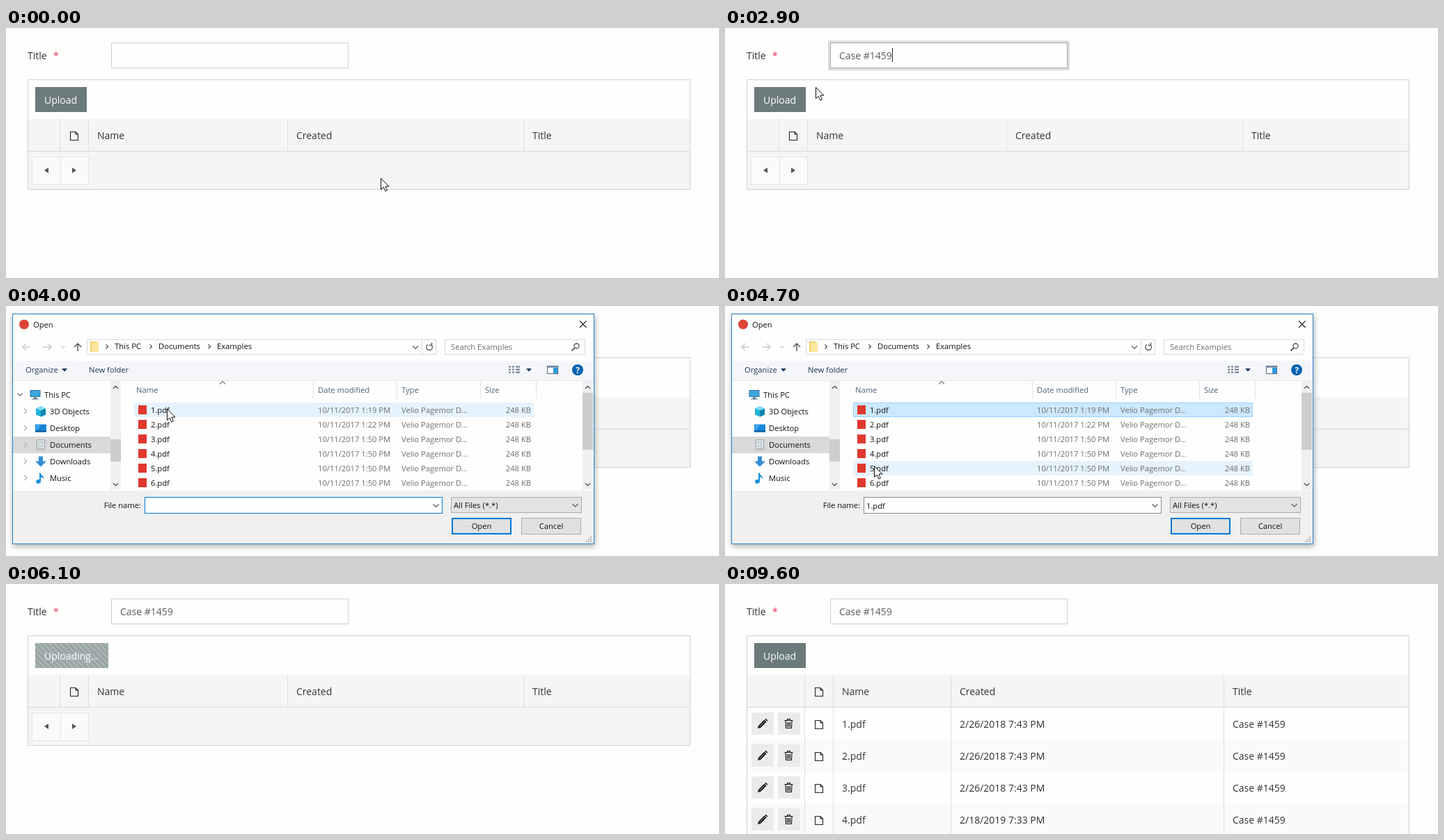
Write an HTML page that moves like this. It is 1024 px wide and 360 px high and loops after 9900 ms.

```html
<!DOCTYPE html>
<html lang="en">
<head>
<meta charset="utf-8">
<title>Upload files</title>
<style>
html, body { margin: 0; width: 100%; height: 100%; overflow: hidden; background: #fefefd; }
svg { display: block; width: 1024px; height: 360px; font-family: "Open Sans", "Noto Sans", sans-serif; }
text { white-space: pre; }
</style>
</head>
<body>
<svg viewBox="0 0 1024 360">
  <defs>
    <filter id="shadow" x="-5%" y="-5%" width="110%" height="115%">
      <feDropShadow dx="1" dy="3" stdDeviation="4" flood-color="#000" flood-opacity=".33"/>
    </filter>
    <pattern id="stripes" width="8" height="8" patternUnits="userSpaceOnUse">
      <path fill="#a9b4b4" d="M0 0h8v8H0z"/>
      <path fill="#96a3a3" d="M0 0H4L8 4V8ZM0 4V8H4Z"/>
    </pattern>
    <clipPath id="panes"><path d="M10 108H844V265H10Z"/></clipPath>
  </defs>
  <g id="scene"></g>
</svg>
<script>
const LOOP = 9900, STEP = 100;
const scene = document.getElementById('scene');
const stripes = document.getElementById('stripes');
const pen = document.createElement('canvas').getContext('2d');
pen.font = '14px "Open Sans", "Noto Sans", sans-serif';

const TITLE = 'Case #1459';
const KEY_TIMES = [1200, 1300, 1400, 1600, 1800, 2000, 2200, 2300, 2500, 2700];
const EMPTY_COLUMNS = [77.5, 118.5, 404.5, 743.5];
const LOADED_COLUMNS = [114.5, 155.5, 360.5, 768.5];
const FINAL_COLUMNS = [114.5, 155.5, 324.5, 716.5];
const POINTER = [
  [0, 538, 216], [300, 256, 41], [600, 256, 41], [900, 596, 294], [2800, 596, 294],
  [2900, 130, 85], [3200, 90, 100], [3600, 90, 100], [4000, 231, 148], [4100, 231, 148],
  [4300, 214, 302], [4400, 210, 252], [4600, 213, 212], [4700, 214, 230], [4900, 214, 230],
  [5200, 684, 315], [5600, 684, 315]
];

const lerp = (a, b, k) => a + (b - a) * k;
const clamp = v => Math.max(0, Math.min(1, v));
const rect = (x, y, w, h, fill, stroke = 'none', width = 1) =>
  `<rect x="${x}" y="${y}" width="${w}" height="${h}" fill="${fill}" stroke="${stroke}" stroke-width="${width}"/>`;
const line = (d, stroke, width = 1) => `<path d="${d}" fill="none" stroke="${stroke}" stroke-width="${width}"/>`;
const shape = (d, fill) => `<path d="${d}" fill="${fill}"/>`;
const label = (x, y, str, fill = '#333', size = 14, extra = '') =>
  `<text x="${x}" y="${y}" fill="${fill}" font-size="${size}" ${extra}>${str}</text>`;
const small = (x, y, str, fill = '#111', extra = '') => label(x, y, str, fill, 11.2, extra);
const group = (content, attrs) => `<g ${attrs}>${content}</g>`;
const at = (x, y, content) => group(content, `transform="translate(${x} ${y})"`);
const chevron = (x, y, dir, color = '#666', s = 3) => line({
  right: `M${x - s / 2} ${y - s}l${s} ${s}l${-s} ${s}`,
  down: `M${x - s} ${y - s / 2}l${s} ${s}l${s} ${-s}`,
  up: `M${x - s} ${y + s / 2}l${s} ${-s}l${s} ${s}`
}[dir], color, 1.2);

function pointerAt(t) {
  const i = POINTER.findIndex(p => p[0] > t);
  if (i < 0) return null;
  const [a, b] = [POINTER[i - 1], POINTER[i]];
  const k = (t - a[0]) / (b[0] - a[0]);
  return { x: lerp(a[1], b[1], k), y: lerp(a[2], b[2], k) };
}

const inside = (p, x, y, w, h) => p && p.x >= x && p.x < x + w && p.y >= y && p.y < y + h;

function pointer(p) {
  if (!p) return '';
  if (inside(p, 151, 21, 341, 37) && !inDialog)
    return at(Math.round(p.x), Math.round(p.y), line('M0 -7.5H3M4 -7.5H7M3.5 -7V7M0 7.5H3M4 7.5H7', '#222'));
  return at(Math.round(p.x) + .5, Math.round(p.y) + .5,
    '<path d="M0 0V16L3.7 12.6L6.3 18.5L8.9 17.4L6.4 11.6H11.4Z" fill="#fff" stroke="#111"/>');
}
let inDialog = false;

const docIcon = (x, y) => at(x, y, line('M.5 .5H8L11.5 4V12.5H.5ZM8 .5V4H11.5', '#222', 1.1));
const pencil = (x, y) => at(x, y,
  shape('M-7 7L-6 3L2.5 -5.5L5.5 -2.5L-3 6ZM3.3 -6.2L4.6 -7.3L7.2 -4.7L6.2 -3.3Z', '#111') +
  line('M-4.7 4.5L3 -3.2', '#ddd', .8));
const trash = (x, y) => at(x, y,
  line('M-6 -4.5H6M-2 -5V-6.5H2V-5M-4.5 -4L-4 6.5H4L4.5 -4M-2 -2V5M0 -2V5M2 -2V5', '#111', 1.1));

function field(t) {
  const focused = t >= 600 && t < 3400;
  const typed = TITLE.slice(0, KEY_TIMES.filter(k => k <= t).length);
  const caret = Math.round(164 + pen.measureText(typed).width) + .5;
  return label(31, 45, 'Title') + label(68, 45, '*', '#f0325a') +
    (focused ? rect(148, 18, 347, 43, '#dcdfde') : '') +
    rect(151.5, 21.5, 340, 36, '#fefefe', focused ? '#a3a9a9' : '#cfcfd3') +
    label(164, 45, typed, '#5a5a63') +
    (focused && t < 3200 ? line(`M${caret} 29V49`, '#222') : '');
}

function uploadButton(t, p) {
  const busy = t >= 5600 && t < 8800;
  const hover = t < 3400 && inside(p, 42, 85, 74, 36);
  const fill = busy ? 'url(#stripes)' : hover ? '#596767' : '#6b7a7a';
  return rect(42, 85, busy ? 105 : 74, 36, fill) +
    label(55, 109, busy ? 'Uploading...' : 'Upload', '#fff', 14, 'font-weight="500"');
}

function gridRow(i, cols, iconAlpha) {
  const y = 178 + 46 * i, base = y + 29;
  const created = i < 3 ? '2/26/2018 7:43 PM' : '2/18/2019 7:33 PM';
  return rect(32, y, 950, 46, i % 2 ? '#fafafc' : '#fefefe') +
    rect(38, y + 7, 32, 32, '#ebebee') + rect(76, y + 7, 32, 32, '#ebebee') +
    group(pencil(54, y + 23) + trash(91.5, y + 23), `opacity="${iconAlpha}"`) +
    docIcon(cols[0] + 14.5, y + 18) +
    label(cols[1] + 12.5, base, `${i + 1}.pdf`) +
    label(cols[2] + 12.5, base, created) +
    label(cols[3] + 12.5, base, TITLE);
}

function grid(t) {
  const loaded = t >= 8800;
  const settle = clamp((t - 9300) / 300);
  const cols = loaded ? LOADED_COLUMNS.map((c, i) => lerp(c, FINAL_COLUMNS[i], settle)) : EMPTY_COLUMNS;
  let out = rect(32, 131, 950, 47, '#f5f5f4') + docIcon(cols[0] + 14.5, 149);
  ['Name', 'Created', 'Title'].forEach((name, i) => { out += label(cols[i + 1] + 12.5, 160, name); });
  if (loaded) {
    for (let i = 0; i < 4; i++) out += gridRow(i, cols, settle);
  } else {
    out += rect(32, 178, 950, 54, '#f5f5f4') +
      rect(37.5, 185.5, 81, 40, '#fafafd', '#e5e5ea') + line('M78.5 186V225', '#e5e5ea') +
      shape('M61 201V209L55 205ZM95 201V209L101 205Z', '#555');
  }
  out += cols.map(c => line(`M${c} 131V${loaded ? 360 : 178}`, '#dedee4')).join('');
  return out + line('M32 177.5H982', '#d9d9dd') +
    rect(31.5, 74.5, 951, loaded ? 300 : 158, 'none', '#cfcfdb');
}

function treeIcon(kind) {
  return {
    pc: rect(1, 1, 14, 9, '#3ba7e0', '#31739b') + shape('M6 11H10V13H13V14H3V13H6Z', '#537083'),
    cube: shape('M1 3L8 0L15 3V12L8 15L1 12Z', '#23b4dc') + shape('M8 6L15 3V12L8 15Z', '#1384b0') + shape('M1 3L8 0L15 3L8 6Z', '#82dcf2'),
    desktop: rect(0, 2, 16, 11, '#1683d8') + shape('M0 11H16V13H0Z', '#0b5c9d') + shape('M1 3H8L3 10H1Z', '#40a8ef'),
    docs: rect(2.5, .5, 11, 14, '#fafafa', '#8d969c') + line('M4 3.5H12M4 6.5H7M8 6.5H12M4 9.5H12M4 12.5H12', '#6f8796'),
    down: shape('M5 0H11V7H16L8 15L0 7H5Z', '#328ed8'),
    music: shape('M6 0H8C8 4 13 4 12 9C11 6 9 6 8 6V12A3.5 3 0 1 1 6 9.5Z', '#1992dc')
  }[kind];
}

function tree(showArrows) {
  const items = [['This PC', 'pc'], ['3D Objects', 'cube'], ['Desktop', 'desktop'],
    ['Documents', 'docs'], ['Downloads', 'down'], ['Music', 'music']];
  let out = rect(10, 188, 140, 24, '#d9d9d9');
  items.forEach(([name, kind], i) => {
    const y = 127.5 + 24 * i, indent = i ? 8 : 0;
    out += at(34 + indent, y - 7, treeIcon(kind)) + small(55 + indent, y + 4.5, name);
    if (showArrows) out += chevron(20 + indent, y, i ? 'right' : 'down', i ? '#aaa' : '#666', 3.5);
  });
  return out + scrollbar(150, 192, 32);
}

const scrollbar = (x, thumbY, thumbH) => rect(x, 108, 15, 157, '#f0f0f0') +
  rect(x, thumbY, 15, thumbH, '#cdcdcd') +
  chevron(x + 7.5, 117, 'up', '#444', 3.5) + chevron(x + 7.5, 257, 'down', '#444', 3.5);

function fileList(p, selected) {
  let out = '';
  for (let i = 0; i < 6; i++) {
    const y = 139 + 21 * i, base = y + 15;
    if (i < selected) out += rect(184.5, y + .5, 573, 20, '#cce8ff', '#99d1ff');
    else if (inside(p, 184, y, 574, 21)) out += rect(184, y, 574, 21, '#e5f3fd');
    const time = ['1:19', '1:22'][i] || '1:50';
    out += rect(190, y + 4, 12, 13, '#e0382f') + small(208, base, `${i + 1}.pdf`) +
      small(448, base, `10/11/2017 ${time} PM`, '#6d6d6d') +
      small(568, base, 'Velio Pagemor D...', '#6d6d6d') +
      small(754, base, '248 KB', '#6d6d6d', 'text-anchor="end"');
  }
  [[187, 'Name'], [448, 'Date modified'], [568, 'Type'], [688, 'Size']].forEach(([x, name]) => {
    out += small(x, 125, name, '#4c607a');
  });
  return out + line('M441.5 108V133M561.5 108V133M681.5 108V133M761.5 108V133', '#e2e2e2') +
    chevron(311, 110.5, 'up', '#777', 4) + scrollbar(828, 125, 82);
}

function dialogChrome() {
  return rect(9.5, 11.5, 835, 331, '#fefefe', '#2580c8') +
    '<circle cx="26" cy="26.5" r="7" fill="#db4437"/>' + small(39, 31, 'Open') +
    line('M824 21.5L833.5 31M833.5 21.5L824 31', '#222', 1.2) +
    line('M35 59H24M29 54L24 59L29 64M53 59H65M60 54L65 59L60 64', '#c9c9c9', 1.4) +
    chevron(82, 59, 'down', '#c9c9c9', 2.5) +
    line('M103 65V54M98 59L103 54L108 59', '#555', 1.5) +
    rect(116.5, 48.5, 501, 21, '#fefefe', '#d9d9d9') +
    shape('M121 51H129L133 53V66H121Z', '#f5cf69') + shape('M123 53H133V66H123Z', '#ffe69c') +
    [[145, 156, 'This PC'], [208, 219, 'Documents'], [292, 303, 'Examples']]
      .map(([c, x, s]) => chevron(c, 58.5, 'right', '#444') + small(x, 62, s)).join('') +
    chevron(588, 59.5, 'down', '#555', 4) + line('M597.5 49V69', '#d9d9d9') +
    line('M611 56A4.3 4.3 0 1 1 606 55.5M611.5 52.5V56.5H607.5', '#555', 1.3) +
    rect(630.5, 48.5, 201, 21, '#fefefe', '#d9d9d9') + small(639, 62.5, 'Search Examples', '#6d6d6d') +
    '<circle cx="819.5" cy="57.5" r="3.5" fill="none" stroke="#555" stroke-width="1.3"/>' +
    line('M817 60L812.5 64.5', '#555', 1.8) +
    rect(10, 79, 834, 28, '#f5f6f9') + line('M10 107.5H844', '#e6e8ec') +
    small(28, 95.5, 'Organize', '#1e395b') + shape('M80 90H88L84 94.5ZM747 90H755L751 94.5Z', '#1e395b') +
    small(119, 95.5, 'New folder', '#1e395b') +
    line('M722 87.5H725M727 87.5H730M732 87.5H738M722 91.5H725M727 91.5H730M732 91.5H738M722 95.5H725M727 95.5H730M732 95.5H738', '#69788c', 2) +
    rect(777.5, 86.5, 15, 11, '#fefefe', '#526b86') + rect(778, 87, 14, 2, '#8aa0b8') + rect(786, 89, 6, 8, '#2a9be0') +
    '<circle cx="821" cy="92" r="8" fill="#0063b1"/>' +
    label(821, 96.5, '?', '#fff', 12, 'font-weight="700" text-anchor="middle"');
}

function dialogFooter(p, t, selected) {
  const names = ['', '1.pdf'][selected] ?? '"5.pdf" "1.pdf" "2.pdf" "3.pdf" "4.pdf"';
  const overOpen = inside(p, 640, 305, 86, 24);
  return rect(10, 266, 834, 76, '#f0f0f1') +
    small(194, 291, 'File name:', '#111', 'text-anchor="end"') +
    rect(199.5, 275.5, 427, 23, '#fefefe', selected ? '#8a8a8a' : '#0078d7') +
    small(203, 291.5, names) + chevron(617.5, 287.5, 'down', '#555', 4) +
    rect(639.5, 275.5, 187, 22, '#e3e3e3', '#adadad') + small(643, 291, 'All Files (*.*)') +
    chevron(817.5, 287, 'down', '#555', 4) +
    rect(641, 306, 84, 22, overOpen ? (t >= 5400 ? '#cce4f7' : '#e5f1fb') : '#e1e1e1', '#0078d7', 2) +
    small(683, 321, 'Open', '#111', 'text-anchor="middle"') +
    rect(740.5, 305.5, 85, 23, '#e1e1e1', '#adadad') +
    small(783, 321, 'Cancel', '#111', 'text-anchor="middle"') +
    shape('M839 332h2v2h-2zM836 335h2v2h-2zM839 335h2v2h-2zM833 338h2v2h-2zM836 338h2v2h-2zM839 338h2v2h-2z', '#b5b5b5');
}

function dialog(t, p) {
  const selected = t < 4100 ? 0 : t < 4900 ? 1 : 5;
  const fading = t < 3500 || t >= 5500;
  const zoom = fading ? 'transform="translate(427 177) scale(.95) translate(-427 -177)" opacity=".5"' : '';
  return group(
    group(dialogChrome(), 'filter="url(#shadow)"') +
    group(tree(t < 4200) + fileList(p, selected), 'clip-path="url(#panes)"') +
    dialogFooter(p, t, selected), zoom);
}

function draw(t) {
  const p = pointerAt(t);
  inDialog = t >= 3400 && t < 5600;
  // The stripes rest for one beat in every five.
  const beat = Math.max(61, t / STEP);
  const shift = 2 * (beat - Math.floor((beat + 2) / 5)) % 8;
  stripes.setAttribute('patternTransform', `translate(${shift} 0)`);
  scene.innerHTML = field(t) + grid(t) + uploadButton(t, p) + (inDialog ? dialog(t, p) : '') + pointer(p);
}

const start = performance.now();
let shown = -1;
function tick() {
  const t = Math.floor((performance.now() - start) % LOOP / STEP) * STEP;
  if (t !== shown) draw(shown = t);
  requestAnimationFrame(tick);
}
tick();
</script>
</body>
</html>
```
